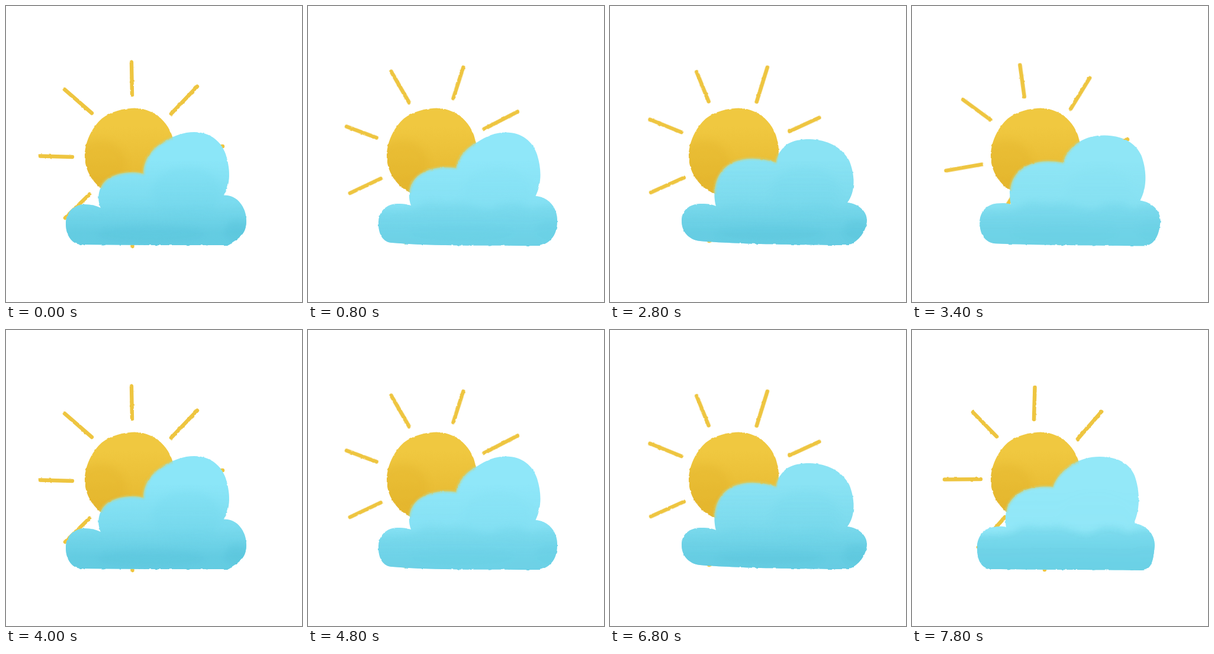
These frames come from a looping animation (500 by 500 pixels, 8010 ms). An HTML page without scripts:

```html
<!DOCTYPE html>
<html lang="en">
<head>
<meta charset="utf-8">
<title>Sun and cloud</title>
<style>
html, body { margin: 0; width: 100%; height: 100%; overflow: hidden; background: #fff; }
svg { display: block; width: 100vw; height: 100vh; }

/* One loop holds two passes of 20 drawings, 200 ms each */
.rays, .cloud, .drift, .shade, .band, .wash { animation: 8010ms infinite; }
.rays { animation-name: spin; transform-origin: 211px 250px; }
.cloud { animation-name: billow; }
.tint { animation-name: billow, tint; }
.drift { animation-name: drift; }
.shade { animation-name: shade; }
.band { animation-name: band; }
.wash { animation-name: wash; }

@keyframes spin {
  0%, 49.93%, 100% { transform: rotate(0deg); animation-timing-function: steps(19); }
  47.43%, 97.37% { transform: rotate(90deg); animation-timing-function: steps(1); }
}
@keyframes billow {
  0%, 49.93%, 100% {
    d: path("M128 403C112 403 101 388 101 368C101 348 115 335 133 335C143 335 152 337 160 341C153 325 156 304 172 292C190 281 212 279 232 283C232 262 245 240 268 229C284 219 300 213 318 213C346 213 364 230 371 250C379 275 380 300 368 320C388 318 406 338 406 363C406 384 396 392 374 404C290 404 210 404 128 403Z");
    animation-timing-function: steps(8);
  }
  19.97%, 69.91% {
    d: path("M157 397C142 396 137 384 137 366C137 346 150 334 168 333C175 332 181 332 188 333C183 318 184 298 198 283C214 266 240 262 268 264C276 248 290 238 304 231C318 221 333 214 350 214C378 214 396 229 403 252C410 275 410 298 401 322C422 326 436 341 436 360C436 386 428 407 408 406C330 405 220 408 157 397Z");
    animation-timing-function: steps(6);
  }
  34.95%, 84.89% {
    d: path("M152 397C133 395 121 381 121 363C121 345 134 335 152 334C161 334 170 334 179 338C174 319 176 295 189 279C206 257 241 252 280 264C283 251 289 241 300 233C311 227 322 225 337 225C368 226 391 238 404 261C414 285 415 314 401 332C420 334 434 347 434 362C433 380 421 397 403 404C330 404 210 402 152 397Z");
    animation-timing-function: steps(5);
  }
  47.43%, 97.37% {
    d: path("M135 404C116 403 110 388 110 367C110 349 122 335 137 333C144 332 152 331 159 333C157 320 157 300 168 287C184 268 210 263 238 265C244 248 256 236 271 227C285 218 300 214 317 214C348 214 368 226 376 246C384 268 387 300 375 326C396 330 410 344 410 364C408 386 406 407 386 406C310 405 210 405 135 404Z");
    animation-timing-function: steps(1);
  }
}
@keyframes tint {
  0%, 49.93%, 100% { fill: #8be6f8; animation-timing-function: steps(8); }
  19.97%, 69.91% { fill: #93e8f9; animation-timing-function: steps(6); }
  34.95%, 84.89% { fill: #8ae3f4; animation-timing-function: steps(5); }
  47.43%, 97.37% { fill: #93e8f8; animation-timing-function: steps(1); }
}
@keyframes drift {
  0%, 49.93%, 100% { transform: translateX(0); }
  19.97%, 69.91% { transform: translateX(0); animation-timing-function: steps(2); }
  24.96%, 74.9% { transform: translateX(14px); animation-timing-function: steps(4); }
  34.95%, 84.89% { transform: translateX(0); }
}
@keyframes shade {
  0%, 49.93%, 100% { transform: translateX(0); animation-timing-function: steps(8); }
  19.97%, 69.91% { transform: translateX(30px); animation-timing-function: steps(6); }
  34.95%, 84.89% { transform: translateX(25px); animation-timing-function: steps(5); }
  47.43%, 97.37% { transform: translateX(4px); animation-timing-function: steps(1); }
}
@keyframes band {
  0%, 49.93%, 100% { opacity: .15; animation-timing-function: steps(8); }
  19.97%, 69.91% { opacity: 1; animation-timing-function: steps(6); }
  34.95%, 84.89% { opacity: .3; animation-timing-function: steps(5); }
  47.43%, 97.37% { opacity: .9; animation-timing-function: steps(1); }
}
@keyframes wash {
  0%, 49.93%, 100% { opacity: 1; animation-timing-function: steps(8); }
  19.97%, 69.91% { opacity: 0; animation-timing-function: steps(6); }
  34.95%, 84.89% { opacity: .9; animation-timing-function: steps(5); }
  47.43%, 97.37% { opacity: .05; animation-timing-function: steps(1); }
}
</style>
</head>
<body>
<svg viewBox="0 0 500 500">
  <defs>
    <filter id="rough" filterUnits="userSpaceOnUse" x="0" y="0" width="500" height="500" color-interpolation-filters="sRGB">
      <feTurbulence type="fractalNoise" baseFrequency=".13" numOctaves="2" seed="4"/>
      <feDisplacementMap in="SourceGraphic" scale="2.4" xChannelSelector="R" yChannelSelector="G"/>
    </filter>
    <filter id="soft" x="-30%" y="-30%" width="160%" height="160%"><feGaussianBlur stdDeviation="6"/></filter>
    <filter id="haze" filterUnits="userSpaceOnUse" x="0" y="0" width="500" height="500"><feGaussianBlur stdDeviation="1.5"/></filter>
    <linearGradient id="gold" x2="0" y2="1">
      <stop offset=".2" stop-color="#f0c840"/>
      <stop offset="1" stop-color="#e4b52d"/>
    </linearGradient>
    <linearGradient id="base" gradientUnits="userSpaceOnUse" x1="0" y1="325" x2="0" y2="400">
      <stop offset="0" stop-color="#80ddef"/>
      <stop offset=".55" stop-color="#6fd3e7"/>
      <stop offset="1" stop-color="#68cee3"/>
    </linearGradient>
    <linearGradient id="deep" gradientUnits="userSpaceOnUse" x1="0" y1="225" x2="0" y2="405">
      <stop offset=".2" stop-color="#62cae0" stop-opacity="0"/>
      <stop offset=".6" stop-color="#62cae0" stop-opacity=".4"/>
      <stop offset=".88" stop-color="#60c9df" stop-opacity=".9"/>
    </linearGradient>
    <path id="ball" d="M133 253C133 230 145 205 162 190C178 178 198 173 217 172.500C256 173 285 205 285 246C285 292 251 324 210 324C166 324 133 292 133 253Z"/>
    <clipPath id="disc"><use href="#ball"/></clipPath>
    <clipPath id="puff"><path class="cloud"/></clipPath>
  </defs>

  <g filter="url(#rough)">
    <use href="#ball" fill="url(#gold)"/>
    <g clip-path="url(#disc)">
      <ellipse cx="160" cy="265" rx="42" ry="38" fill="#dfae26" opacity=".25" filter="url(#soft)"/>
    </g>
    <path class="rays" fill="none" stroke="#eec540" stroke-width="6.4" stroke-linecap="round"
      d="M212 95L213 150M323 136L279 182M366 237L309 242M328 349L277 304M213.500 406L213 345M100 358L141 318M58 253.500L112 255M99 141L145 181"/>
  </g>

  <g filter="url(#rough)">
    <g class="drift">
      <path class="cloud tint"/>
      <g clip-path="url(#puff)">
        <g class="shade">
          <path class="band" fill="url(#base)" filter="url(#soft)"
            d="M80 430L90 350C125 340 150 352 175 336C190 324 215 338 235 332C260 330 275 348 300 342C320 328 345 332 360 342C385 332 410 332 430 350V430Z"/>
          <g class="wash">
            <path fill="url(#deep)" d="M60 200H450V430H60Z"/>
            <ellipse cx="305" cy="315" rx="58" ry="44" fill="#66d0e6" opacity=".15" filter="url(#soft)"/>
            <ellipse cx="392" cy="378" rx="22" ry="17" fill="#50bdd5" opacity=".3" filter="url(#soft)"/>
            <ellipse cx="245" cy="384" rx="90" ry="14" fill="#54c1d9" opacity=".25" filter="url(#soft)"/>
          </g>
        </g>
      </g>
    </g>
    <g clip-path="url(#disc)">
      <g class="drift" filter="url(#haze)">
        <path class="cloud" fill="none" stroke="#c3d38a" stroke-width="3.5" opacity=".75"/>
      </g>
    </g>
  </g>
</svg>
</body>
</html>
```
